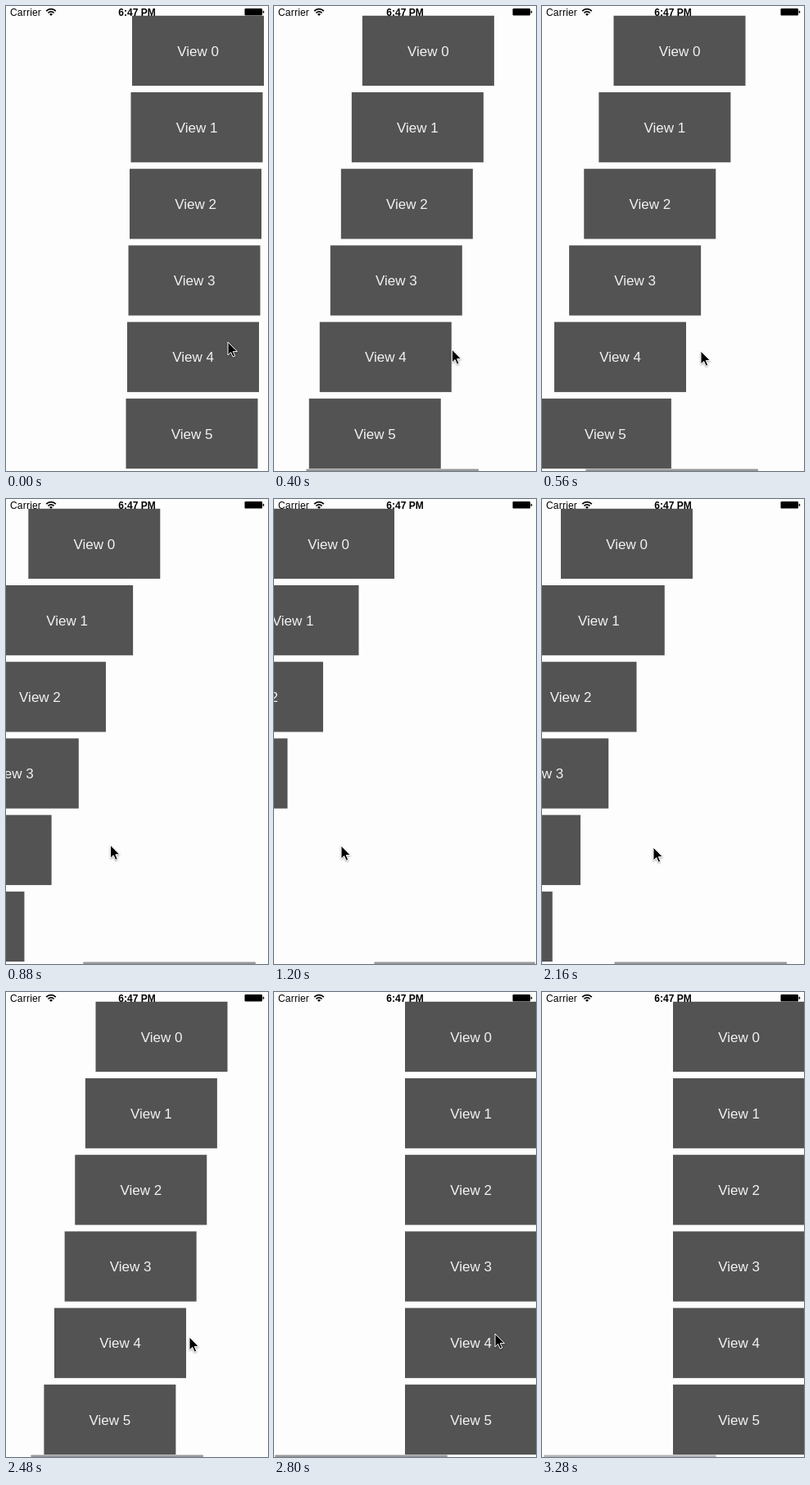
An HTML page that plays this animation: 320x566 px, repeating every 3360 ms.

```html
<!DOCTYPE html>
<html lang="en">
<head>
<meta charset="utf-8">
<title>Staggered scroll</title>
<style>
  html, body { margin: 0; width: 100%; height: 100%; overflow: hidden; background: #fdfdfd; }
  svg { display: block; width: 320px; height: 566px; font-family: "Liberation Sans", Arial, sans-serif; }
  #views rect { fill: #535353; }
  #views text { fill: #f2f2f2; font-size: 17px; text-anchor: middle; }
  #status { font-size: 12px; }
  #cursor { filter: drop-shadow(0 1px 1px rgba(0, 0, 0, .35)); }
</style>
</head>
<body>
<svg viewBox="0 0 320 566">
  <g id="views"></g>
  <g id="status">
    <text x="5" y="11.5" letter-spacing=".2">Carrier</text>
    <g fill="none" stroke="#000" stroke-width="1.7">
      <path d="M49.2 6.1a8 8 0 0 1 11.6 0M51.4 8.5a5 5 0 0 1 7.2 0"/>
      <path d="M53 9.9a2.8 2.8 0 0 1 4 0L55 12z" fill="#000" stroke="none"/>
    </g>
    <text x="160" y="11.5" font-weight="bold" text-anchor="middle">6:47 PM</text>
    <rect x="291.5" y="3" width="21.5" height="8.6" rx="1.3"/>
    <path d="M313.7 5.6q1.6.2 1.6 1.7t-1.6 1.7z"/>
  </g>
  <rect id="bar" y="563.4" height="2.5" rx="1.25" fill="#999"/>
  <path id="cursor" d="M0 0V16l3.7-3.5 2.5 5.7 2.5-1.1-2.4-5.5h5.1z" stroke="#fff"/>
</svg>
<script>
const LOOP = 3360, STEP = 80, BAR_LEAD = 35, MAX = 160;
const $ = id => document.getElementById(id);

// time, scroll offset, cursor x, cursor y
const keys = [
  [0, 6, 271, 409],
  [560, 72.5, 194, 420],
  [1200, 174, 82, 422],
  [1520, 177, 78, 423],
  [1780, 177, 78, 423],
  [2160, 137, 136, 424],
  [2480, 50.5, 224, 420],
  [2760, 0, 270, 416],
  [2840, -1.5, 270, 416],
  [3100, 0, 270, 416],
  [LOOP, 0, 270, 416]
];

const slope = (i, c) => (keys[i + 1][c] - keys[i][c]) / (keys[i + 1][0] - keys[i][0]);

// Tangent that never overshoots its neighbouring keys
function tangent(i, c) {
  if (i === 0) return slope(0, c);
  if (i === keys.length - 1) return 0;
  const a = slope(i - 1, c), b = slope(i, c);
  return a * b > 0 ? 2 * a * b / (a + b) : 0;
}

function at(t, c) {
  t = Math.min(t, LOOP);
  let i = 0;
  while (i < keys.length - 2 && t >= keys[i + 1][0]) i++;
  const p = keys[i], q = keys[i + 1], h = q[0] - p[0], u = (t - p[0]) / h, v = 1 - u;
  return v * v * (1 + 2 * u) * p[c] + u * u * (3 - 2 * u) * q[c]
    + h * u * v * (v * tangent(i, c) - u * tangent(i + 1, c));
}

for (let i = 0; i < 6; i++) {
  const y = 11.8 + 93.2 * i;
  $('views').innerHTML += `<g><rect y="${y}" width="161" height="85.3"/>
    <text x="80.5" y="${y + 48.7}">View ${i}</text></g>`;
}
const views = [...$('views').children];

function drawBar(t) {
  const d = at(t + BAR_LEAD, 1);
  const x = 2 + .66 * Math.min(d, MAX) + Math.max(0, d - MAX);
  $('bar').setAttribute('x', x);
  $('bar').setAttribute('width', Math.min(319, x + 211) - x);
  $('bar').setAttribute('opacity', Math.min(1, t / 160, 1 - (t - 3200) / 270));
}

function draw(now) {
  const t = Math.floor(now % LOOP / STEP) * STEP;
  const d = Math.max(0, at(t, 1));
  views.forEach((g, i) => g.setAttribute('transform', `translate(${160 - d * (1 + i / 4)})`));
  drawBar(t);
  $('cursor').setAttribute('transform', `translate(${at(t, 2)} ${at(t, 3)})`);
  $('cursor').style.display = t < 2960 ? '' : 'none';
}

const start = performance.now();
function tick() {
  draw(performance.now() - start);
  requestAnimationFrame(tick);
}
tick();
</script>
</body>
</html>
```
